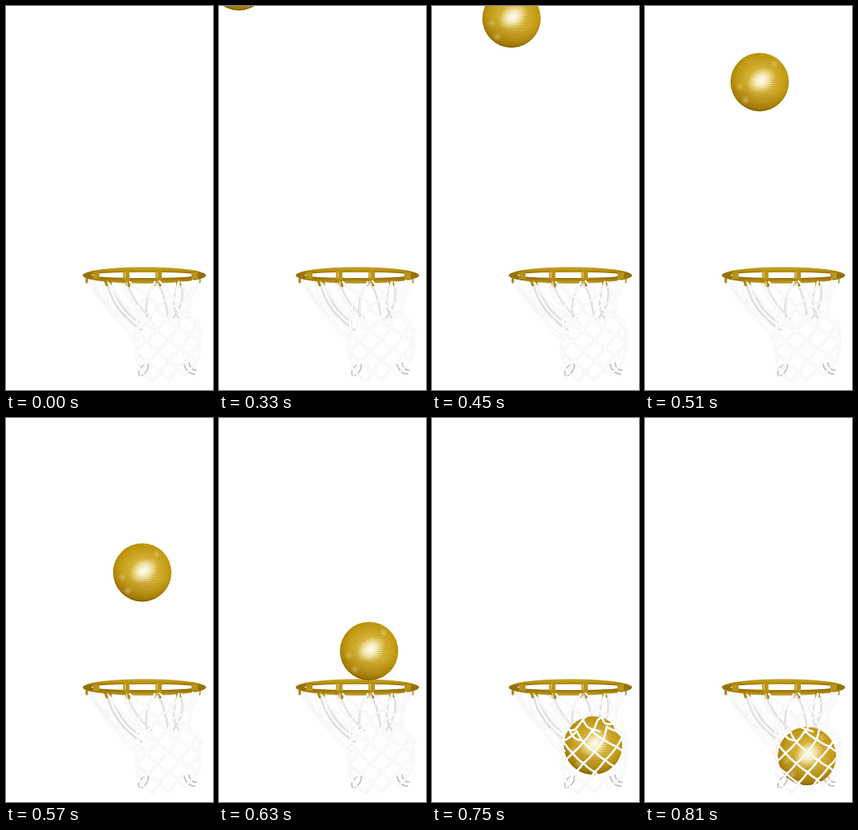
An HTML page that plays this animation: 259x480 px, repeating every 1.8 s.

```html
<!DOCTYPE html>
<html lang="en">
<head>
<meta charset="utf-8">
<title>Golden ball</title>
<style>
  html, body { margin: 0; width: 100%; height: 100%; overflow: hidden; background: #fff; }
  svg { display: block; width: 100%; height: 100%; }
  path { fill: none; stroke-linecap: round; stroke-linejoin: round; }
  .edge { stroke: #e3e3e3; stroke-width: 2.7; }
  .cord { stroke: #fff; stroke-width: 1.9; }
  .back .edge { stroke: #c6c6c6; stroke-width: 2.2; }
  .back .cord { stroke: #f2f2f2; stroke-width: 1.1; }
  .tiles path { stroke: #745200; stroke-width: .9; stroke-dasharray: 1 1.2; stroke-linecap: butt; opacity: .5; }
  .ring { fill: url(#metal); fill-rule: evenodd; }
  .tab { stroke: #b8931c; stroke-width: 8; stroke-linecap: butt; }
  .hook { stroke: #a8820e; stroke-width: 3; }
  .shine { stroke: #e0c05a; stroke-width: 1.6; }
  .loop { stroke: #c2c2c2; stroke-width: 1.8; }
</style>
</head>
<body>
<svg viewBox="0 0 259 480" preserveAspectRatio="none">
  <defs>
    <radialGradient id="gold" cx=".53" cy=".48" r=".56">
      <stop offset="0" stop-color="#fffae0"/>
      <stop offset=".18" stop-color="#f3e3a0"/>
      <stop offset=".4" stop-color="#dcb93c"/>
      <stop offset=".72" stop-color="#cba317"/>
      <stop offset="1" stop-color="#b18607"/>
    </radialGradient>
    <linearGradient id="shade" x1=".65" y1="0" x2=".35" y2="1">
      <stop offset=".55" stop-color="#7a5200" stop-opacity="0"/>
      <stop offset="1" stop-color="#7a5200" stop-opacity=".35"/>
    </linearGradient>
    <radialGradient id="spark">
      <stop offset="0" stop-color="#fff" stop-opacity=".9"/>
      <stop offset="1" stop-color="#fff0a0" stop-opacity="0"/>
    </radialGradient>
    <linearGradient id="metal" x1="0" y1="0" x2="0" y2="1">
      <stop offset="0" stop-color="#c8a634"/>
      <stop offset=".2" stop-color="#b8930f"/>
      <stop offset=".38" stop-color="#94720a"/>
      <stop offset=".65" stop-color="#93700a"/>
      <stop offset=".85" stop-color="#b38d12"/>
      <stop offset="1" stop-color="#c5a748"/>
    </linearGradient>
    <filter id="soft" x="-5%" y="-30%" width="110%" height="160%">
      <feGaussianBlur stdDeviation=".6"/>
    </filter>
  </defs>

  <g class="back" id="back"></g>
  <path class="loop" d="M167 462C164 457 169 450 174 448M170 462C175 459 179 453 178 448M223 448C224 455 231 461 236 460M229 446C229 451 234 456 238 455"/>

  <g filter="url(#soft)">
    <path class="ring" d="M96 336.7a77.2 10.4 0 0 1 154.4 0a77.2 10.4 0 0 1 -154.4 0zM107 336.4a66 3.7 0 0 0 132 0a66 3.7 0 0 0 -132 0z"/>
    <path class="tab" d="M150.5 331V342M191 331V342M113 333V341M236 333V341"/>
    <path class="hook" d="M101 341V345M124 343L126 349M130 343L131 348M147 343L149 350M154 343L154 350M186 343L185 349M192 343L193 349M214 343L215 349M220 343L219 348M242 341V345"/>
    <path class="shine" d="M149 333V339M189 333V339M127 344V347M151 344V348M189 344V347M217 344V347"/>
  </g>

  <g id="ball" visibility="hidden">
    <circle r="36.5" fill="url(#gold)"/>
    <circle r="36.5" fill="url(#shade)"/>
    <g id="tiles" class="tiles" transform="rotate(8)"></g>
    <g fill="url(#spark)">
      <ellipse rx="21" ry="13" cx="3" cy="-1" transform="rotate(-35)"/>
      <circle cx="-18" cy="23" r="6" opacity=".35"/>
      <circle cx="-25" cy="6" r="6" opacity=".3"/>
      <circle cx="18" cy="-23" r="6" opacity=".35"/>
    </g>
  </g>

  <g id="front"></g>
</svg>
<script>
  const $ = id => document.getElementById(id);
  const ns = 'http://www.w3.org/2000/svg';

  function addPath(parent, d, cls) {
    const p = document.createElementNS(ns, 'path');
    p.setAttribute('d', d);
    if (cls) p.setAttribute('class', cls);
    parent.append(p);
  }

  function addCords(parent, list) {
    for (const cls of ['edge', 'cord']) addPath(parent, list.join(''), cls);
  }

  addCords($('back'), [
    'M127 348C132 370 147 390 170 405',
    'M131 348C139 366 146 382 166 395',
    'M152 349C158 366 171 381 182 391',
    'M176 388C173 366 181 348 188 348C196 350 200 372 203 389',
    'M214 349C206 374 211 384 217 391',
    'M219 348C224 366 217 380 209 390'
  ]);

  const cords = [
    'M104 344C110 358 122 372 136 388S154 408 166 416',
    'M109 344C115 362 128 376 143 386S158 404 164 404',
    'M122 346C120 362 136 380 144 396S158 410 162 418',
    'M129 347C140 362 150 382 172 390',
    'M148 347C150 366 164 372 172 390S186 400 190 404',
    'M155 345C164 356 184 364 189 377S200 388 210 392',
    'M186 345C182 358 166 370 164 382S166 396 164 404',
    'M192 344C202 356 211 362 213 374S222 382 228 382',
    'M216 345C214 362 198 366 189 377S180 392 172 390',
    'M220 345C222 358 234 364 228 382',
    'M234 343C232 358 222 372 213 374S206 388 200 393',
    'M241 343C238 356 226 366 228 382S242 396 245 406'
  ];

  // Lower mesh: [left x, left y, right x, right y] of each row of knots
  const rows = [
    [172, 390, 228, 382],
    [164, 404, 240, 394],
    [162, 418, 245, 406],
    [162, 431, 244, 419],
    [164, 444, 243, 431],
    [168, 456, 240, 443],
    [174, 468, 233, 456]
  ];
  const cols = 3;
  function knot(i, j) {
    const [x1, y1, x2, y2] = rows[i];
    const u = (j + (i % 2 ? 0 : .5)) / cols;
    return [x1 + (x2 - x1) * u, y1 + (y2 - y1) * u + 20 * u * (1 - u)];
  }
  function link(a, b) {
    return `M${a}Q${(a[0] + b[0]) / 2} ${(a[1] + b[1]) / 2 + 2} ${b}`;
  }
  for (let i = 0; i < rows.length - 1; i++) {
    const wide = i % 2;
    for (let j = 0; j < cols + wide; j++) {
      for (const k of wide ? [j - 1, j] : [j, j + 1]) {
        if (k >= 0 && k < cols + 1 - wide) cords.push(link(knot(i, j), knot(i + 1, k)));
      }
    }
  }
  for (const side of [0, cols]) {
    cords.push(link(knot(1, side), knot(3, side)), link(knot(3, side), knot(5, side)));
  }
  addCords($('front'), cords);

  // Curved rows of mirror tiles
  const R = 36, tilt = .3;
  for (let a = -81; a <= 81; a += 4.5) {
    const lat = a * Math.PI / 180, rx = R * Math.cos(lat);
    const y = R * Math.sin(lat) * Math.cos(tilt);
    addPath($('tiles'), `M${-rx} ${y}A${rx} ${rx * tilt} 0 0 0 ${rx} ${y}`);
  }

  // Flight: time, x, y, x speed, y speed
  const flight = [
    [330, 25, -31, .58, .12],
    [450, 99.5, 15.5, .69, 1.01],
    [510, 143.5, 95, .59, 1.48],
    [570, 170.5, 193, .36, 1.58],
    [690, 197.3, 369, .1, .9],
    [810, 202.7, 422.5, 0, 0]
  ];
  function place(t) {
    const n = flight.findIndex(p => p[0] >= t);
    if (n < 0) return flight[flight.length - 1].slice(1, 3);
    if (n === 0) return flight[0].slice(1, 3);
    const a = flight[n - 1], b = flight[n], h = b[0] - a[0], s = (t - a[0]) / h;
    const s2 = s * s, s3 = s2 * s;
    return [1, 2].map(k =>
      (2 * s3 - 3 * s2 + 1) * a[k] + (s3 - 2 * s2 + s) * h * a[k + 2] +
      (3 * s2 - 2 * s3) * b[k] + (s3 - s2) * h * b[k + 2]);
  }

  const ball = $('ball'), loop = 1800, tick = 30;
  const start = performance.now();
  function draw() {
    const t = Math.floor(((performance.now() - start) % loop) / tick) * tick;
    ball.setAttribute('visibility', t < flight[0][0] ? 'hidden' : 'visible');
    ball.setAttribute('transform', `translate(${place(t)})`);
    requestAnimationFrame(draw);
  }
  draw();
</script>
</body>
</html>
```
